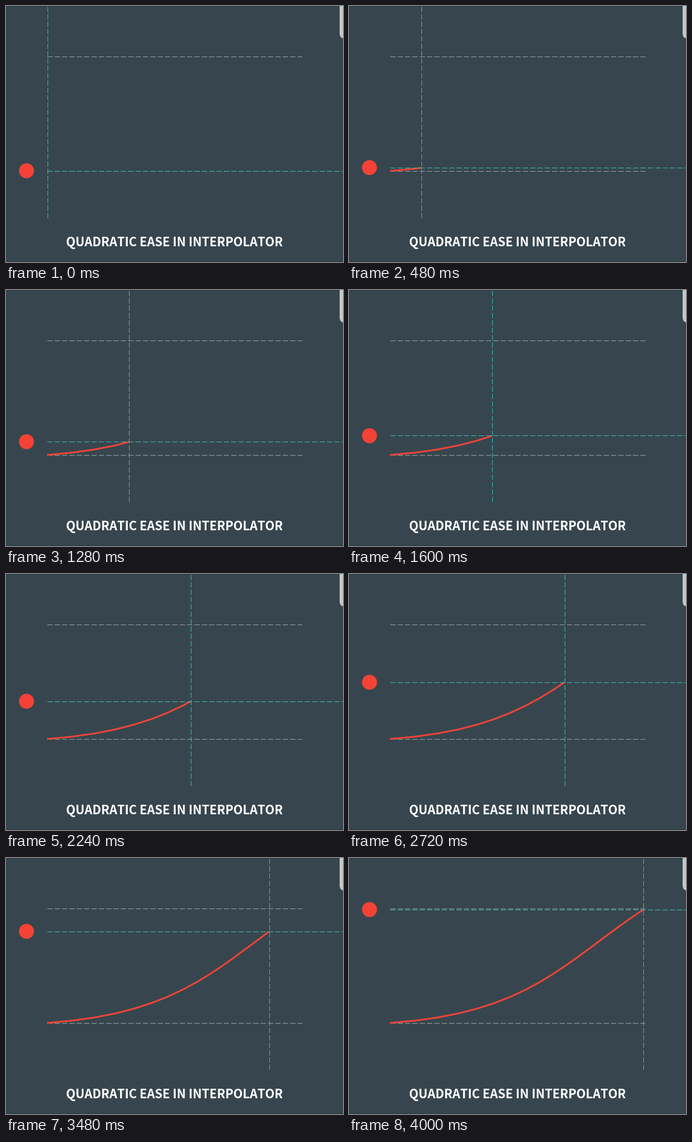
Animation of 600 by 456 pixels, one loop 4040 ms. Source, as a matplotlib script:

```python
import numpy as np
import matplotlib.pyplot as plt
from matplotlib.animation import FuncAnimation
from matplotlib.patches import Circle, FancyBboxPatch, Rectangle

W, H, DPI = 600, 456, 96
FRAMES, STEP = 101, 40
PX = 72 / DPI

BG, EDGE = "#37464e", "#29353b"
TEAL, GREY, RED = "#3abfba", "#9ca3a6", "#f44336"
LEFT, RIGHT, TOP, BASE = 73, 527, 89.5, 293.5

plt.rcParams["lines.scale_dashes"] = False

# Ease-in cubic Bezier, flattened to sixteen straight pieces
s = np.linspace(0, 1, 17)
b1, b2, b3 = 3 * s * (1 - s) ** 2, 3 * s**2 * (1 - s), s**3
EASE_X = LEFT + (RIGHT - LEFT) * (0.55 * b1 + 0.68 * b2 + b3)
EASE_Y = BASE - (BASE - TOP) * (0.085 * b1 + 0.53 * b2 + b3)

# Near-linear sweep with the small drift of a screen capture
TIMES = [0, 920, 1600, 2240, 2720, 3480, 4000]
SWEEP = [73.5, 179.5, 254.5, 328.5, 383.5, 468.5, 523.5]

fig = plt.figure(figsize=(W / DPI, H / DPI), dpi=DPI, facecolor=BG)
ax = fig.add_axes([0, 0, 1, 1])
ax.set_xlim(0, W)
ax.set_ylim(H, 0)
ax.axis("off")


def dashed(xs, ys, color, z):
    line, = ax.plot(xs, ys, color=color, lw=PX, zorder=z,
                    dashes=(9.4 * PX, 3.7 * PX), dash_capstyle="butt")
    return line


for y in (0, H - 1):
    ax.add_patch(Rectangle((0, y), W, 1, color=EDGE, lw=0))
ax.add_patch(FancyBboxPatch((594, -30), 40, 88, fc="#c4c7c8", lw=0,
                            boxstyle="round,pad=0,rounding_size=9"))

for y in (TOP, BASE):
    dashed([LEFT, RIGHT], [y, y], GREY, 2)
level = dashed([LEFT, W], [BASE, BASE], TEAL, 4)
cursor = dashed([LEFT, LEFT], [1, 378], TEAL, 4)
curve, = ax.plot([], [], color=RED, lw=3 * PX, zorder=3,
                 solid_capstyle="butt", solid_joinstyle="round")
ball = ax.add_patch(Circle((36.5, BASE), 13.3, color=RED, lw=0, zorder=5))

ax.text(W / 2, 428, "QUADRATIC EASE IN INTERPOLATOR", color="white",
        family="Noto Sans CJK JP", weight="bold", size=21.7 * PX,
        ha="center", va="baseline")


def update(i):
    x = np.interp(i * STEP, TIMES, SWEEP)
    y = BASE if i == 0 else np.interp(x, EASE_X, EASE_Y)
    level.set_ydata([y, y])
    cursor.set_xdata([x, x])
    ball.center = (36.5, y)
    done = EASE_X < x
    if i:
        curve.set_data(np.append(EASE_X[done], x),
                       np.append(EASE_Y[done], y) + 0.3)
    else:
        curve.set_data([], [])
    return level, cursor, ball, curve


anim = FuncAnimation(fig, update, frames=FRAMES, interval=STEP,
                     repeat=True, repeat_delay=0, blit=False)
plt.show()
```
